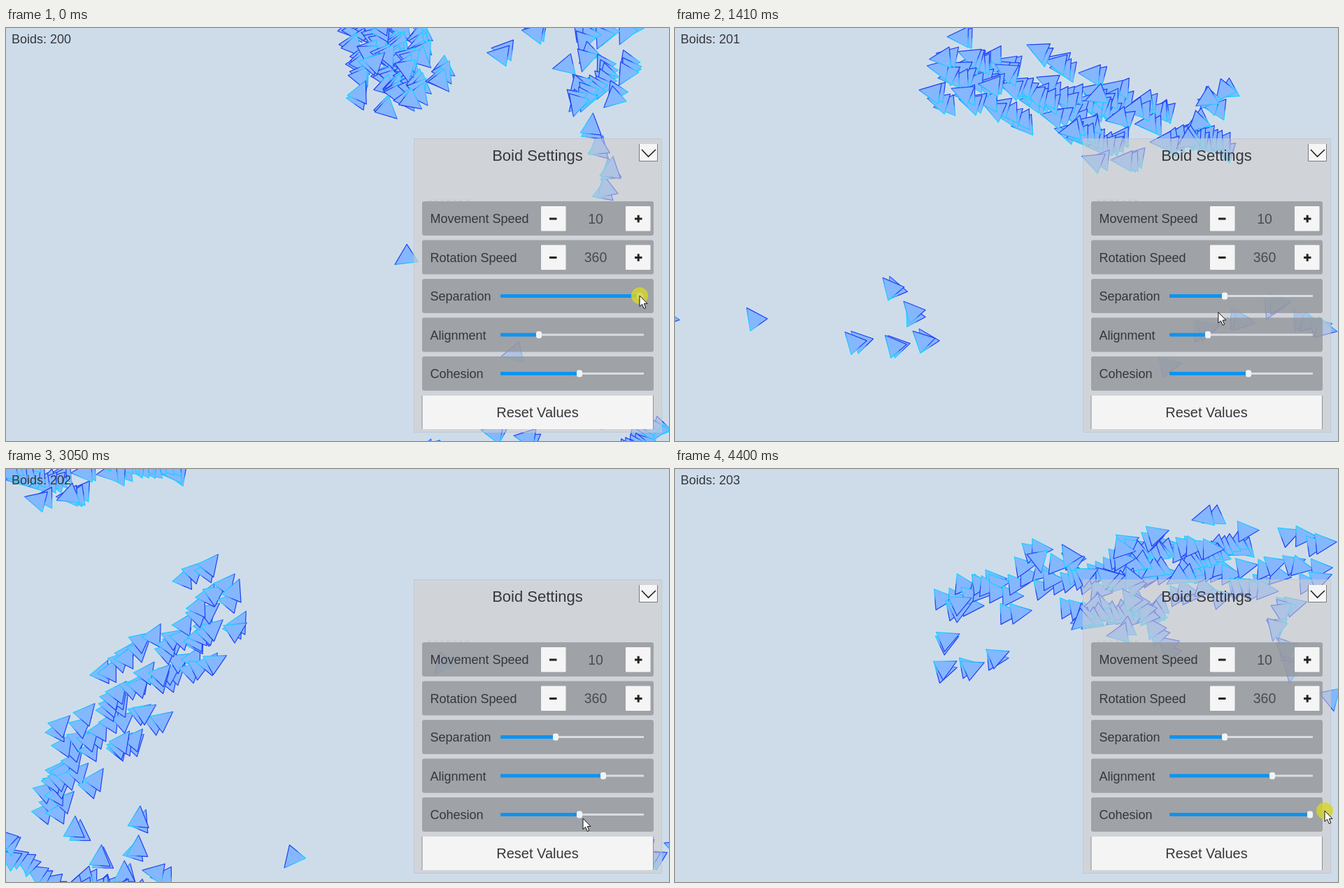
Write an HTML page that moves like this. It is 948 px wide and 591 px high and loops after 4430 ms.

```html
<!DOCTYPE html>
<html lang="en">
<head>
<meta charset="utf-8">
<title>Boids</title>
<style>
  html, body { margin: 0; width: 100%; height: 100%; overflow: hidden; background: #cedcea; }
  svg { display: block; width: 948px; height: 591px; }
  text { font-family: "Liberation Sans", Arial, sans-serif; font-size: 18px; fill: #35373b; }
  .boid { fill: #85b7ff; stroke: url(#edge); stroke-width: 1.2; stroke-linejoin: round; }
</style>
</head>
<body>
<svg viewBox="0 0 948 591">
  <defs>
    <linearGradient id="edge" gradientUnits="userSpaceOnUse" x1="0" y1="-10" x2="0" y2="10">
      <stop offset="0" stop-color="#18d2ff"/>
      <stop offset=".4" stop-color="#2a9cff"/>
      <stop offset=".6" stop-color="#1f3ff2"/>
    </linearGradient>
  </defs>
  <rect width="948" height="591" fill="#cedcea"/>
  <g id="boids"></g>
  <text id="count" x="8" y="22"></text>
  <rect x="583.5" y="158.5" width="354" height="420" fill="#d2cecd" fill-opacity=".55" stroke="#bcc3cb" stroke-opacity=".7"/>
  <text x="760" y="190" text-anchor="middle" style="font-size:22px">Boid Settings</text>
  <rect x="906" y="166" width="25" height="24" fill="#f5f5f5"/>
  <path d="M905.5 166V190.5H931.5V166" fill="none" stroke="#777a80"/>
  <path d="M909 174L918.5 184L929 174" fill="none" stroke="#222" stroke-width="1.6"/>
  <path d="M603 246.5H662" stroke="#b2b5ba" stroke-dasharray="5 4" stroke-opacity=".6"/>
  <g id="rows"></g>
  <rect x="595" y="526" width="331" height="48" fill="#f4f4f4"/>
  <path d="M595 526V574M925.5 526V574" stroke="#8e9196"/>
  <text x="760" y="557" text-anchor="middle" style="font-size:20px">Reset Values</text>
  <circle id="press" r="12" fill="#d6d42c" fill-opacity=".82"/>
  <path id="arrow" d="M0 0V15.5L3.6 12.3L6.2 18.5L8.8 17.4L6.3 11.4H11Z" fill="#fff" stroke="#111"/>
</svg>
<script>
const LOOP = 4430;
const $ = id => document.getElementById(id);
const clamp = (v, lo, hi) => Math.min(hi, Math.max(lo, v));

function add(parent, tag, attrs, label) {
  const el = document.createElementNS("http://www.w3.org/2000/svg", tag);
  for (const k in attrs) el.setAttribute(k, attrs[k]);
  if (label) el.textContent = label;
  parent.appendChild(el);
  return el;
}

let seed = 7;
function rand() {
  seed = (seed * 16807) % 2147483647;
  return seed / 2147483647;
}
const spread = () => rand() + rand() - 1;

// Smooth curve through one waypoint per time
const TIMES = [0, 960, 1860, 2360, 3050, 3770, 4400];

function along(path, t) {
  let i = 0;
  while (i < TIMES.length - 2 && t >= TIMES[i + 1]) i++;
  const p = Math.max(0, i - 1), n = Math.min(TIMES.length - 1, i + 2);
  const h = TIMES[i + 1] - TIMES[i], s = (t - TIMES[i]) / h, r = 1 - s;
  return [0, 1].map(k => {
    const a = path[i][k], b = path[i + 1][k];
    const ma = (b - path[p][k]) / (TIMES[i + 1] - TIMES[p]) * h;
    const mb = (path[n][k] - a) / (TIMES[n] - TIMES[i]) * h;
    return r * r * (1 + 2 * s) * a + s * s * (3 - 2 * s) * b + s * r * (r * ma - s * mb);
  });
}

// A flock stretches along its heading; its length goes from len0 to len1
const flocks = [];
function flock(n, len0, len1, width, path) {
  const members = [];
  for (let i = 0; i < n; i++) {
    const mate = i % 2 && members[i - 1];
    members.push({
      u: mate ? mate.u + .02 + rand() * .03 : (i + rand()) / n - .5,
      v: mate ? mate.v + spread() * .2 : spread(),
      turn: spread() * .35,
      el: add($("boids"), "path", { class: "boid", d: "M19 0L-11 15V-15Z" })
    });
  }
  flocks.push({ members, len0, len1, width, path });
}
const loner = path => flock(1, 0, 0, 0, path);

flock(86, 140, 550, 65, [[555, 38], [600, 100], [365, 38], [150, -145], [180, -315], [415, -465], [655, -480]]);
flock(56, 210, 260, 58, [[870, 20], [800, 145], [530, 135], [385, 45], [125, 0], [-150, 82], [-295, 160]]);
flock(16, 100, 220, 45, [[1530, 660], [1555, 735], [1340, 680], [1205, 565], [985, 555], [790, 350], [640, 180]]);
flock(11, 220, 250, 45, [[570, 650], [740, 450], [1000, 438], [1120, 440], [1240, 320], [1460, 170], [1690, 130]]);
flock(10, 110, 90, 55, [[735, 625], [422, 545], [209, 284], [124, 107], [149, -98], [188, -312], [412, -388]]);
flock(8, 110, 100, 60, [[855, 185], [872, 55], [600, 190], [450, 85], [150, -20], [-90, 105], [-122, 245]]);
loner([[572, 328], [234, 525], [8, 252], [-97, 128], [-365, 280], [-500, 561], [-470, 765]]);
loner([[726, 466], [625, 525], [772, 435], [573, 460], [410, 556], [440, 780], [640, 750]]);
loner([[800, 54], [745, 60], [440, 123], [330, 40], [90, 38], [-70, 146], [-52, 328]]);

const wrap = (v, size) => ((v + 21) % size + size) % size - 21;

function drawBoids(t) {
  for (const { members, len0, len1, width, path } of flocks) {
    const [x, y] = along(path, t), [x0, y0] = along(path, t - 20), [x1, y1] = along(path, t + 20);
    const head = Math.atan2(y1 - y0, x1 - x0), c = Math.cos(head), s = Math.sin(head);
    const len = len0 + (len1 - len0) * t / LOOP;
    for (const m of members) {
      const f = m.u * len, g = m.v * width;
      const px = wrap(x + c * f - s * g, 990), py = wrap(y + s * f + c * g, 635);
      const deg = (head + m.turn) * 180 / Math.PI;
      m.el.setAttribute("transform", `translate(${px.toFixed(1)} ${py.toFixed(1)}) rotate(${deg.toFixed(1)})`);
    }
  }
}

// Pointer waypoints [time, x, y], straight between them
const pointer = [
  [0, 906, 383], [150, 906, 383], [960, 784, 388], [1150, 786, 388], [1830, 762, 437], [2360, 818, 427],
  [2650, 854, 430], [3050, 825, 500], [3300, 820, 492], [3770, 850, 489], [4250, 929, 489], [LOOP, 929, 489]
];
function pointAt(t) {
  const i = pointer.findIndex((p, k) => k > 0 && t <= p[0]);
  const [ta, xa, ya] = pointer[i - 1], [tb, xb, yb] = pointer[i];
  const s = (t - ta) / (tb - ta);
  return [xa + (xb - xa) * s, ya + (yb - ya) * s];
}

const rows = $("rows");
let rowY = 248;
function row(label) {
  const y = rowY;
  rowY += 55.5;
  add(rows, "rect", { x: 595, y, width: 331, height: 49, rx: 3, fill: "#94979c", "fill-opacity": .8 });
  add(rows, "text", { x: 606.5, y: y + 31 }, label);
  return y;
}

function stepper(label, value) {
  const y = row(label);
  for (const x of [765, 886]) add(rows, "rect", { x, y: y + 7, width: 35.5, height: 35.5, rx: 1, fill: "#f5f5f5" });
  add(rows, "path", { d: `M777 ${y + 25}h10.5M899 ${y + 25}h10.5M904.2 ${y + 19.8}v10.4`, stroke: "#222", "stroke-width": 3 });
  add(rows, "text", { x: 843, y: y + 31.5, "text-anchor": "middle", style: "font-size:19.5px;fill:#4a4c50" }, value);
}

// The knob follows the pointer from press to release
const sliders = [];
function slider(label, from, to) {
  const mid = row(label) + 24.5;
  add(rows, "rect", { x: 707, y: mid - 1.5, width: 205, height: 3, fill: "#d9dce2" });
  const bar = add(rows, "rect", { x: 707, y: mid - 2.5, height: 5, rx: 1, fill: "#0d94f0" });
  const knob = add(rows, "rect", { y: mid - 5, width: 8, height: 10, rx: 3, fill: "#f2f3f5" });
  sliders.push({ from, to, bar, knob });
}

stepper("Movement Speed", "10");
stepper("Rotation Speed", "360");
slider("Separation", 0, 1150);
slider("Alignment", 1830, 2650);
slider("Cohesion", 3300, LOOP);

function draw(t) {
  drawBoids(t);
  $("count").textContent = "Boids: " + (200 + Math.floor((t + 1150) / 1500));
  for (const { from, to, bar, knob } of sliders) {
    const x = clamp(pointAt(clamp(t, from, to))[0], 707, 908);
    bar.setAttribute("width", x - 707);
    knob.setAttribute("x", x - 4);
  }
  const spot = `translate(${pointAt(t)})`;
  const held = sliders.some(s => t >= s.from && t <= s.to);
  $("arrow").setAttribute("transform", spot);
  $("press").setAttribute("transform", spot);
  $("press").setAttribute("visibility", held ? "visible" : "hidden");
}

let start;
function tick(now) {
  if (start === undefined) start = now;
  draw((now - start) % LOOP);
  requestAnimationFrame(tick);
}
draw(0);
requestAnimationFrame(tick);
</script>
</body>
</html>
```
